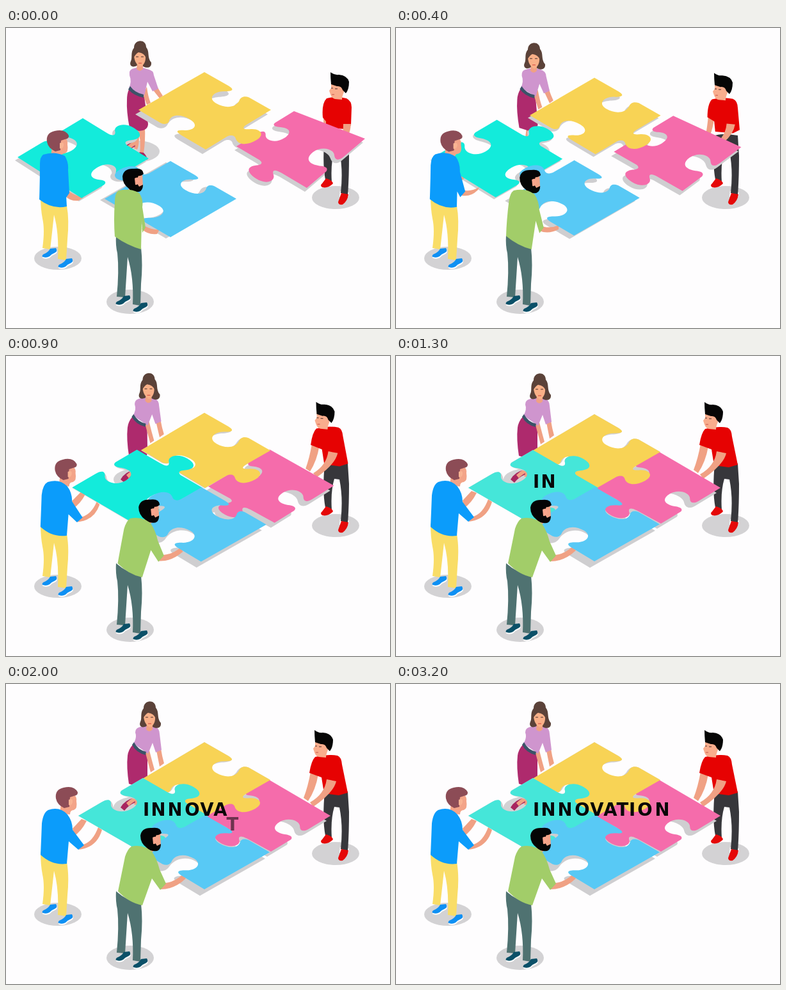
These frames come from a looping animation (600 by 469 pixels, 3300 ms). An HTML page:

```html
<!DOCTYPE html>
<html lang="en">
<head>
<meta charset="utf-8">
<title>Innovation puzzle</title>
<style>
html, body { margin: 0; width: 100%; height: 100%; overflow: hidden; background: #fefdfe; }
svg { display: block; width: 100%; height: 100%; }
text { font: 700 27.5px "DejaVu Sans", Lato, sans-serif; text-anchor: middle; fill: #080808; }
</style>
</head>
<body>
<svg id="stage" viewBox="0 0 600 469"></svg>
<script>
const LOOP = 3300, STEP = 100, MOVE = 1000;
const stage = document.getElementById('stage');
const movers = [];
const lerp = (a, b, p) => a + (b - a) * p;

function add(tag, attrs, parent = stage) {
  const el = document.createElementNS('http://www.w3.org/2000/svg', tag);
  for (const key in attrs) el.setAttribute(key, attrs[key]);
  return parent.appendChild(el);
}

// A path that morphs into a second outline with the same commands.
function shape(fill, from, to) {
  const el = add('path', { fill, d: from });
  if (!to) return;
  const ends = to.match(/-?[\d.]+/g).map(Number);
  movers.push(p => {
    let i = 0;
    el.setAttribute('d', from.replace(/-?[\d.]+/g, n => lerp(+n, ends[i++], p).toFixed(2)));
  });
}

// A group of rigid parts that glides by (dx, dy).
function glide(dx, dy, parts) {
  const g = add('g', {});
  for (const [fill, d, stroke] of parts)
    add('path', stroke ? { d, fill: 'none', stroke, 'stroke-width': 1 } : { d, fill }, g);
  movers.push(p => g.setAttribute('transform', `translate(${dx * p} ${dy * p})`));
}

function ground(cx, cy, rx = 37, ry = 18) {
  add('ellipse', { cx, cy, rx, ry, fill: '#d3d2d4' });
}

function shoe(x, y, fill) {
  const g = add('g', { transform: `translate(${x} ${y})` });
  const d = 'M13 1L22 0Q25 5 21 7Q16 9 12 13Q7 16 2 14Q-1 13 2 10Q10 7 13 1Z';
  add('path', { d, fill: '#fff', transform: 'translate(.5 2)' }, g);
  add('path', { d, fill }, g);
}

// Jigsaw edge as (along, outward) pairs: a line, four cubics, a line.
const TAB = [[.36, 0], [.45, 0], [.47, .03], [.41, .08], [.32, .14], [.35, .27], [.5, .27],
  [.63, .27], [.70, .2], [.64, .1], [.60, .05], [.61, .01], [.67, 0]];
const SIDES = [[0, 0, 1, 0], [1, 0, 0, 1], [1, 1, -1, 0], [0, 1, 0, -1]];

function outline(edges, quad) {
  const at = (u, v) => [0, 1].map(k =>
    lerp(lerp(quad[0][k], quad[1][k], u), lerp(quad[3][k], quad[2][k], u), v).toFixed(2)).join(' ');
  let d = 'M' + at(0, 0);
  SIDES.forEach(([x, y, dx, dy], side) => {
    const kind = edges[side];
    if (kind) TAB.forEach(([s, o], i) => {
      const out = o * kind;
      d += (i === 0 ? 'L' : i % 3 === 1 ? 'C' : ' ') + at(x + dx * s + dy * out, y + dy * s - dx * out);
    });
    d += 'L' + at(x + dx, y + dy);
  });
  return d + 'Z';
}

// Corners run top, right, bottom, left; edges give tab depth (negative cuts in);
// shade is the shadow offset at both ends.
const pieces = [
  { fill: '#f56cab', edges: [0, -1.2, 1, -1], shade: [-3, 6, -6, 8],
    from: [[450, 130], [561, 173], [470, 250], [360, 185]], to: [[408, 148], [507, 206], [414, 262], [311, 206]] },
  { fill: '#f8d355', edges: [-1.2, 1, -1, 0], shade: [-5, 7, 0, 0],
    from: [[310, 69], [414, 128], [312, 190], [207, 128]], to: [[310, 91], [413, 150], [311, 208], [212, 149]] },
  { fill: '#13ebdb', late: '#45e6d9', edges: [1, -1, 0, -1.2], shade: [-4, 5, 0, 0],
    from: [[120, 141], [223, 204], [118, 266], [18, 202]], to: [[214, 147], [316, 206], [212, 263], [113, 206]] },
  { fill: '#58c9f5', edges: [-1, 0, -1.2, 1], shade: [-7, 2, -7, 10],
    from: [[257, 208], [360, 267], [257, 327], [154, 267]], to: [[311, 205], [412, 263], [310, 321], [212, 262]] }
];

function addShadows() {
  for (const piece of pieces) piece.shadow = add('path', { fill: '#cfced0' });
}

function addPieces() {
  for (const piece of pieces) {
    const el = add('path', { fill: piece.fill });
    const hollow = piece.edges.map(kind => kind < 0 ? kind * 1.3 : kind);
    movers.push(p => {
      const quad = piece.from.map((c, i) => c.map((n, k) => lerp(n, piece.to[i][k], p)));
      const [x0, y0, x1, y1] = piece.shade;
      el.setAttribute('d', outline(piece.edges, quad));
      el.setAttribute('fill', p === 1 && piece.late || piece.fill);
      piece.shadow.setAttribute('d', outline(hollow, quad));
      piece.shadow.setAttribute('transform', `translate(${lerp(x0, x1, p)} ${lerp(y0, y1, p)})`);
    });
  }
}

const SKIN = '#f0a184', DARK = '#4a302c';

function woman() {
  shape(SKIN, 'M204 155L217 155Q218 176 215 196L209 197Q211 178 208 168Q208 184 205 190L200 188Z');
  shape('#a8265f', 'M179 193Q186 181 200 178L202 185Q191 190 185 198Z');
  shape(SKIN, 'M188 186Q194 180 202 176L204 182Q196 186 192 191Z');
  shape('#a8265f', 'M208 194L215 195Q220 200 221 206L214 204Z');
  shape('#ae2a6d', 'M192 96Q203 105 216 107L222 150Q222 160 208 161L193 156Q188 130 189 112Q189 103 192 96Z',
    'M198 95Q207 107 221 109L221 150Q221 160 208 161L192 156Q188 130 190 112Q191 103 198 95Z');
  shape(SKIN, 'M214 104L220 92Q222 108 226 117L220 120Z', 'M218 108L224 104Q228 120 232 134L226 138Z');
  shape(SKIN, 'M229 96L237 93Q241 100 245 106L240 110Z', 'M235 104L242 101Q244 114 247 124L240 129Z');
  shape('#cf95ce', 'M197 64Q209 59 220 64Q231 66 231 74L238 95L229 99L221 84L216 106L192 94Q197 84 193 74Q192 66 197 64Z',
    'M207 68Q220 62 233 66Q240 70 240 78L243 103L234 107L229 92L222 109L199 93Q205 84 202 76Q202 70 207 68Z');
  shape('#3b5368', 'M194 91Q201 101 215 104L215 109Q200 106 191 96Z', 'M200 91Q206 103 219 106L218 111Q203 107 197 95Z');
  glide(15, 7, [
    ['#5b4239', 'M200 31C200 17 219 17 219 30C225 37 220 46 227 54C228 64 217 63 213 59L204 59C197 63 192 58 195 52C198 46 194 38 200 31Z'],
    [SKIN, 'M205 55H214V64Q209 70 204 64Z'],
    ['#f9b088', 'M200 42C202 34 215 34 218 42C219 51 216 58 210 61C204 58 200 51 200 42Z'],
    ['#5b4239', 'M199 47Q200 33 209 32Q219 35 219 47Q216 39 207 38Q203 40 199 47Z'],
    ['', 'M203 45H207M211 45H215', DARK],
    ['', 'M207 55H212', '#d5443f']
  ]);
}

function redMan() {
  shape('#fff', 'M498 234L511 239L510 246L496 243ZM522 255L536 257L535 264L521 264Z');
  shape('#37373b', 'M498 168Q510 164 534 168L536 200Q536 235 534 261L523 258Q527 222 521 193L513 192Q507 212 509 241L499 237Q494 212 498 168Z');
  shape('#e50808', 'M500 235Q510 238 511 243Q504 251 494 249Q490 246 494 243Z');
  shape('#e50808', 'M524 258L535 260Q534 270 526 276Q519 277 519 272Z');
  shape(SKIN, 'M496 138L503 142Q503 150 503 158L497 157Q496 150 496 138Z',
    'M476 137L488 141Q484 165 472 183L465 178Q472 160 476 137Z');
  shape('#e60202', 'M501 110Q516 106 532 110Q540 114 540 124L539 152L531 158L500 156L500 146L495 140Q493 118 501 110Z',
    'M483 114Q502 109 518 112Q524 114 525 126L534 170L520 174L497 171L493 146L474 139Q477 120 483 114Z');
  shape(SKIN, 'M527 150L539 150Q538 162 534 170L526 168Q527 160 527 150Z',
    'M501 149L516 152Q512 170 480 192L475 185Q498 172 501 149Z');
  glide(-25, 3, [
    ['#f9ad8d', 'M508 86L527 84L528 100Q525 107 525 112L514 111Q509 110 507 104L505 98L508 94Z'],
    ['#060606', 'M507 69Q513 74 520 73Q533 74 536 84Q536 96 531 102L526 97Q524 90 517 91L508 88Q507 78 507 69Z'],
    ['', 'M508 94H511M514 95H518', DARK],
    ['', 'M509 104H513', '#c7544c']
  ]);
}

function frontArms() {
  shape(SKIN, 'M96 230L97 240Q100 240 104 238L104 232Z', 'M104 226L106 238Q118 230 126 214L118 211Z');
  shape(SKIN, 'M93 263L99 256Q108 262 121 265L113 270Q100 271 93 263Z',
    'M113 259L121 251Q136 246 144 224L150 228Q142 256 113 259Z');
  shape(SKIN, 'M212 314L218 310Q228 316 240 315L236 322Q222 324 212 314Z',
    'M240 321L249 311Q262 310 276 298L281 304Q262 322 240 321Z');
}

function leftMan() {
  shape('#f9dd67', 'M54 262Q74 284 95 278Q99 300 96 330L94 363L81 361Q83 320 75 292Q72 320 69 346L57 344Q61 315 57 298Q54 282 54 262Z');
  shoe(56, 344, '#0f90f3');
  shoe(81, 360, '#0f90f3');
  glide(14, 1, [
    ['#f3a488', 'M74 176L92 172Q97 175 96 182Q98 194 92 196Q86 196 86 203L70 201L72 186Z'],
    ['#8c4c56', 'M64 178Q62 164 76 161Q92 157 98 168Q99 173 92 174L86 176L85 191L77 193Q66 188 64 178Z'],
    ['#f9b493', 'M84 180Q91 177 90 184Q88 190 84 188Z']
  ]);
  shape('#0b9cfb', 'M58 198Q76 192 92 200Q98 210 97 222L99 258L92 268L94 262L95 279Q72 284 52 268Q53 240 53 212Q53 202 58 198Z',
    'M66 197Q84 191 96 204Q104 214 104 228L122 252L113 259L98 246L95 281Q72 284 54 267Q55 245 56 218Q58 201 66 197Z');
}

function greenMan() {
  shape('#4f7271', 'M172 324Q190 340 211 343Q214 370 211 400L210 434L198 432Q200 390 190 358Q188 390 186 421L173 420Q177 380 174 352Q171 340 172 324Z');
  shoe(171, 418, '#0b5068');
  shoe(198, 429, '#0b5068');
  glide(28, 5, [
    ['#f3a488', 'M198 228L213 227L214 248L200 258L190 258Z'],
    ['#050505', 'M182 232Q184 219 200 220Q214 218 215 228Q210 232 207 231L203 240L208 248L214 245Q214 254 208 256Q196 257 192 251Q182 244 182 232Z'],
    ['#f9a58c', 'M201 235Q208 231 208 239Q207 246 202 245Z']
  ]);
  shape('#a2cd69', 'M176 254Q196 250 208 258Q215 268 213 280L218 312L213 320L212 300L211 346Q190 340 170 326Q168 300 170 272Q170 258 176 254Z',
    'M196 254Q214 250 228 262Q236 274 240 290L250 312L241 322L228 304L213 346Q192 342 175 324Q180 300 186 270Q190 258 196 254Z');
}

ground(204, 193, 36, 17);
ground(515, 265);
ground(81, 360);
ground(194, 428, 37, 19);
woman();
redMan();
addShadows();
frontArms();
addPieces();
leftMan();
greenMan();

const centers = [219, 238, 264, 291, 314, 335, 354, 369, 389, 416];
const letters = [...'INNOVATION'].map((char, i) => {
  const el = add('text', { x: centers[i], y: 206 });
  el.textContent = char;
  return el;
});

// Each letter rises into place while it quickly fades in.
function type(time) {
  letters.forEach((el, i) => {
    const p = Math.min(1, Math.max(0, (time - 958 - 171 * i) / 150));
    el.setAttribute('opacity', p && Math.min(1, .35 + p * 2));
    el.setAttribute('y', 206 + 23 * (1 - p * p));
  });
}

let start = null;
function draw(now) {
  start ??= now;
  const time = Math.floor(((now - start) % LOOP) / STEP) * STEP;
  const p = Math.min(1, time / MOVE);
  movers.forEach(move => move(p));
  type(time);
  requestAnimationFrame(draw);
}
requestAnimationFrame(draw);
</script>
</body>
</html>
```
